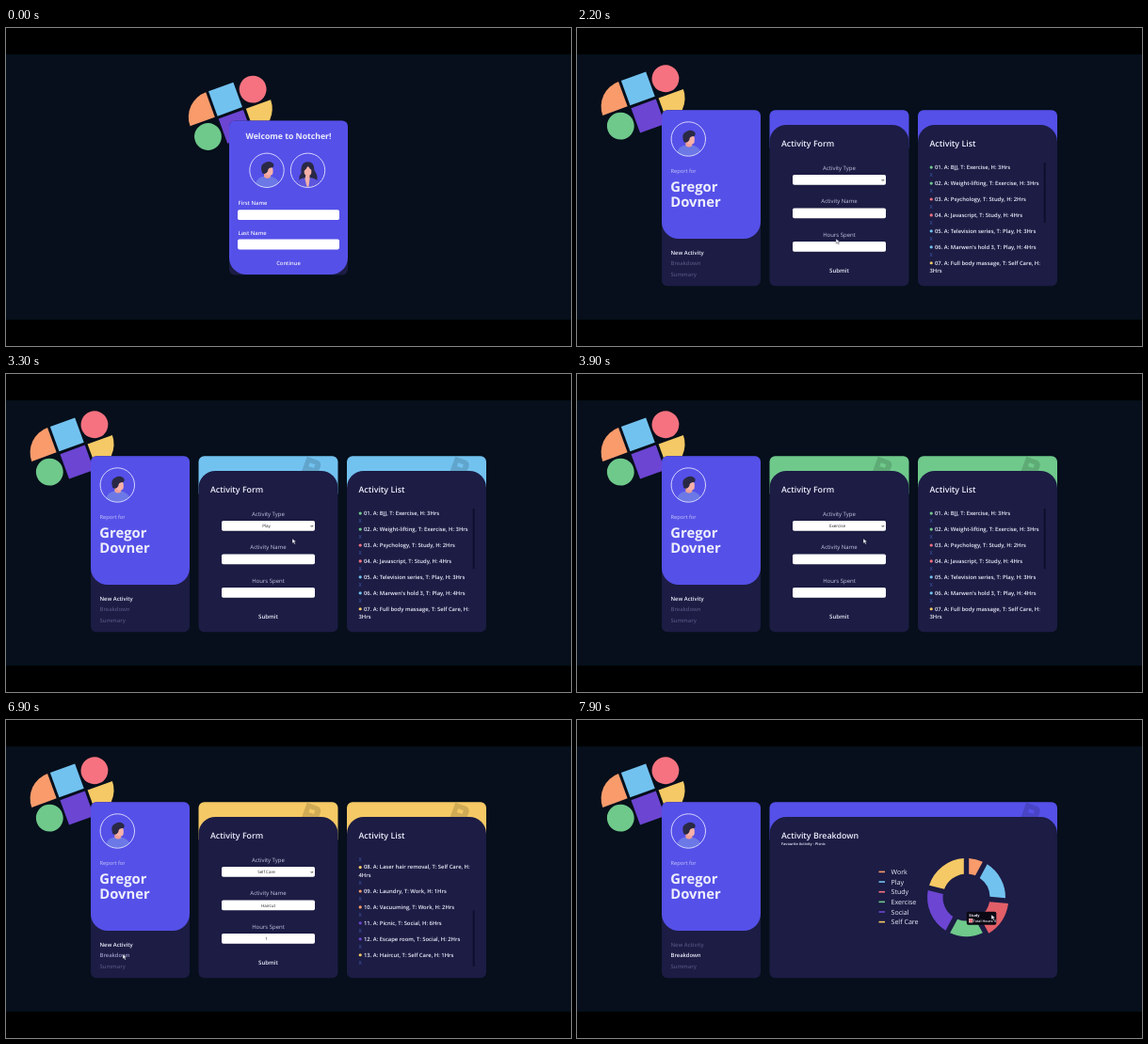
An HTML page for the animation above (8000 ms loop, 600 by 338 pixels).

```html
<!DOCTYPE html>
<html lang="en">
<head>
<meta charset="utf-8">
<title>Activity report demo</title>
<style>
html, body { margin: 0; width: 100%; height: 100%; overflow: hidden; background: #000; }
svg { display: block; width: 100vw; height: 100vh; }
text { font-family: "Open Sans", "Noto Sans", sans-serif; font-weight: 600; fill: #eeeefc; text-rendering: geometricPrecision; white-space: pre; }
.b { font-weight: 700; }
.r { font-weight: 400; }
.m { text-anchor: middle; }
.soft { fill: #c6c6e4; }
.field { fill: #222; font-weight: 400; }
</style>
</head>
<body>
<svg id="stage" viewBox="0 0 600 338"></svg>
<script>
const INDIGO = '#5550e8', NAVY = '#1c1c44', LOOP = 8000, LINE = 8.47;
const COLOR = {
  Work: '#f99b6b', Play: '#72c2f0', Study: '#f67280',
  Exercise: '#6fc98b', Social: '#6c45d2', 'Self Care': '#f5c965'
};
const FIRST = 'Gregor', LAST = 'Dovner';
const ACTIVITIES = [
  ['BJJ', 'Exercise', 3], ['Weight-lifting', 'Exercise', 3], ['Psychology', 'Study', 2],
  ['Javascript', 'Study', 4], ['Television series', 'Play', 3], ["Marwen's hold 3", 'Play', 4],
  ['Full body massage', 'Self Care', 3], ['Laser hair removal', 'Self Care', 4],
  ['Laundry', 'Work', 1], ['Vacuuming', 'Work', 2], ['Picnic', 'Social', 6],
  ['Escape room', 'Social', 2], ['Haircut', 'Self Care', 1]
];

// --- markup helpers ---
const text = (x, y, size, str, cls = '', more = '') =>
  `<text x="${x}" y="${y}" font-size="${size}" class="${cls}" ${more}>${str}</text>`;
const rect = (x, y, w, h, fill, r = 0, more = '') =>
  `<rect x="${x}" y="${y}" width="${w}" height="${h}" rx="${r}" fill="${fill}" ${more}/>`;
const disc = (x, y, r, fill, more = '') => `<circle cx="${x}" cy="${y}" r="${r}" fill="${fill}" ${more}/>`;
const path = (d, fill, more = '') => `<path d="${d}" fill="${fill}" ${more}/>`;
const input = (x, y, w) => rect(x, y, w, 10.8, '#fff', 1.8);

// Box with separate top and bottom corner radii
function panel(x, y, w, h, top, bottom, fill, more) {
  return path(`M${x} ${y + top}a${top} ${top} 0 0 1 ${top} ${-top}h${w - 2 * top}a${top} ${top} 0 0 1 ${top} ${top}` +
    `v${h - top - bottom}a${bottom} ${bottom} 0 0 1 ${-bottom} ${bottom}h${2 * bottom - w}a${bottom} ${bottom} 0 0 1 ${-bottom} ${-bottom}z`, fill, more);
}

function shapes(x, y) {
  return `<g transform="translate(${x} ${y}) rotate(-20)">` +
    path('M-17 14h-28a28 28 0 0 1 28-28z', COLOR.Work) + rect(-14, -14, 28, 28, COLOR.Play) +
    disc(31, 0, 14.4, COLOR.Study) + disc(-31, 31, 14.4, COLOR.Exercise) +
    rect(-14, 17, 28, 28, COLOR.Social) + path('M17 17h28a28 28 0 0 1-28 28z', COLOR['Self Care']) + '</g>';
}

const ring = disc(0, 0, 18.2, 'none', 'stroke="#e4e4ff" stroke-width=".9"');
const man = path('M-12 14Q-10 7-3 6.5L4 6.5Q11 8 13 13Q8 18 0 18Q-8 18-12 14z', '#6b78e6') +
  path('M-3 2h7v5q-3 3-7 0z', '#ee9f98') + rect(-1.5, -4, 8, 9.5, '#f6b1a8', 3.5) +
  path('M-5 3Q-8-6-2-8Q3-11 7-7Q8-4 6-3Q1-3 1 1Q-1 5-5 3z', '#2a2945') + ring;
const woman = path('M-8 13Q-11 8-7 3Q-8-9 0-9Q7-9 7 0Q12 7 9 13Q0 17-8 13z', '#2a2945') +
  path('M-12 14Q-9 8-3 8L4 8Q10 9 12 14Q6 18 0 18Q-7 18-12 14z', '#5d55dc') +
  path('M-2 3h4v6l-1 8.5h-2l-2-8z', '#f2b0aa') + rect(-3.8, -4, 7.6, 9.5, '#f6b1a8', 3.6) +
  path('M-5 1Q-5-7 1-7Q5-6 5 0Q2-1 0-5Q-2 0-5 1z', '#2a2945') + ring;
const avatar = (x, y, who, id = '') => `<g id="${id}" transform="translate(${x} ${y})">${who}</g>`;

function card(x, w, title) {
  const icon = x + w - 28;
  return panel(x, 87.3, w, 40, 6, 0, INDIGO, 'class="banner"') +
    `<g class="icon" opacity=".15" transform="translate(${icon} 98) rotate(20)">` +
    path('M-8-8h12a5 5 0 0 1 5 5v5a5 5 0 0 1-5 5h-4v9h-8zM-3-3v4h6v-4z', '#000', 'fill-rule="evenodd"') + '</g>' +
    panel(x, 103, w, 171.3, 18, 6, NAVY) + text(x + 12.5, 125.5, 8.85, title);
}

// --- scenes ---
const login = shapes(233, 75.7) +
  panel(237, 98.5, 126, 164, 6, 6, NAVY) + panel(237, 98.5, 126, 163.5, 6, 18, INDIGO) +
  text(300, 118, 8.7, 'Welcome to Notcher!', 'b m') +
  avatar(277, 151.3, man, 'picked') + avatar(320.5, 151.3, woman) +
  text(246.5, 188.3, 5.85, 'First Name') + input(246, 193.2, 108) + text(300, 200.3, 4.5, '', 'field m', 'id="first"') +
  text(246.5, 220, 5.85, 'Last Name') + input(246, 224.6, 108) + text(300, 231.8, 4.5, '', 'field m', 'id="last"') +
  text(300, 251.6, 5.85, 'Continue', 'm');

const side = shapes(64.8, 64.4) +
  panel(90, 87.3, 105, 187, 6, 6, NAVY) + panel(90, 87.3, 105, 136.7, 6, 18, INDIGO) +
  avatar(118.3, 118, man) + text(99.5, 153.6, 5.7, 'Report for', 'r', 'style="fill:#c9c8fa"') +
  text(99.3, 174, 14.8, FIRST, 'b') + text(99.3, 189.5, 14.8, LAST, 'b') +
  ['New Activity', 'Breakdown', 'Summary'].map((s, i) =>
    text(99.5, 240.5 + 11.5 * i, 5.9, s, 'menu')).join('');

const form = card(204.5, 148, 'Activity Form') +
  ['Activity Type', 'Activity Name', 'Hours Spent'].map((s, i) =>
    text(278.5, 150.5 + 35.5 * i, 6, s, 'r m soft') + input(229, 156 + 35.5 * i, 99)).join('') +
  path('M323.6 161l1.3 1.4 1.3-1.4', 'none', 'stroke="#222" stroke-width=".8"') +
  text(276.5, 163.2, 4.5, '', 'field m', 'id="type"') +
  text(278.5, 198.7, 4.5, '', 'field m', 'id="name"') +
  text(276.5, 234.2, 4.5, '', 'field m', 'id="hours"') +
  path('M321.8 232l1.3-1.6 1.3 1.6zM321.8 233.2l1.3 1.6 1.3-1.6z', '#555', 'id="spin"') +
  text(278.5, 260.2, 6.05, 'Submit', 'm');

let line = 0;
const rows = ACTIVITIES.map(([name, type, hours], i) => {
  const y = 150 + line * LINE, wraps = i === 6 || i === 7;
  const head = `${String(i + 1).padStart(2, '0')}. A: ${name}, T: ${type}, H:`;
  line += wraps ? 3 : 2;
  return `<g class="row">` + disc(376.2, y - 1.9, 1.6, COLOR[type]) +
    text(380, y, 5.85, wraps ? head : `${head} ${hours}Hrs`) +
    (wraps ? text(374.5, y + LINE, 5.85, hours + 'Hrs') : '') +
    text(374.5, 150 + (line - 1) * LINE, 5.6, 'X', 'r', 'style="fill:#4560b8"') + '</g>';
}).join('');
const list = card(362, 148, 'Activity List') +
  `<clipPath id="view"><rect x="370" y="143" width="130" height="119"/></clipPath>` +
  `<g clip-path="url(#view)"><g id="rows">${rows}</g></g>` + rect(495.8, 143, 1.8, 60, '#0e0e2b', 0, 'id="thumb"');

const types = Object.keys(COLOR);
const breakdown = card(204.5, 305.5, 'Activity Breakdown') +
  text(217, 133, 3.9, 'Favourite Activity - Picnic') +
  types.map((type, i) => rect(320.5, 160.6 + 10.65 * i, 6.5, 1.6, COLOR[type]) +
    text(333.5, 164 + 10.65 * i, 7.1, type, 'r') + path('', COLOR[type], 'class="slice"')).join('') +
  `<g id="tip">` + rect(413.8, 203.8, 31.5, 14, '#0a0812', 1.8) + text(416.3, 209, 3.9, 'Study', 'b') +
  rect(416.3, 211.3, 3.8, 3.8, COLOR.Study, 0, 'stroke="#fff" stroke-width=".4"') +
  text(420.8, 214.7, 3.7, 'Total Hours: 6') + '</g>';

const stage = document.getElementById('stage');
stage.innerHTML = rect(0, 0, 600, 338, '#000') + rect(0, 28, 600, 282, '#060f1b') +
  `<g id="login">${login}</g><g id="side">${side}</g><g id="entry">${form}${list}</g><g id="stats">${breakdown}</g>` +
  `<g id="cursor">` + path('M0 0v5l1.3-1.1 1 2 1-.5-1-1.9 1.7-.2z', '#f4f4ff', 'id="arrow" stroke="#223" stroke-width=".4"') +
  path('M-.8-4h1.6M0-4v8M-.8 4h1.6', 'none', 'id="beam" stroke="#333" stroke-width=".6"') + '</g>';

// --- motion ---
const $ = id => document.getElementById(id);
const all = sel => [...stage.querySelectorAll(sel)];
const banners = all('.banner'), icons = all('.icon'), menu = all('.menu'), lines = all('.row'), slices = all('.slice');
const show = (el, on) => el.style.display = on ? '' : 'none';
const clamp = (t, a, b) => Math.min(1, Math.max(0, (t - a) / (b - a)));
const ease = p => p * p * (3 - 2 * p);
const typed = (str, t, a, b) => str.slice(0, Math.round(str.length * clamp(t, a, b)));

const PICKS = [[2800, 'Work'], [3150, 'Play'], [3600, 'Study'], [3850, 'Exercise'], [4100, 'Social'], [4350, 'Self Care']];
const MOVES = [
  [100, 300, 175], [300, 277, 152], [600, 277, 199], [1800, 277, 199], [2200, 275, 224],
  [2700, 305, 162], [3250, 304, 175], [4450, 304, 175], [4650, 278, 197], [5050, 278, 197],
  [5200, 278, 232], [5400, 282, 257], [5600, 282, 257], [5900, 440, 200], [6400, 440, 200],
  [6900, 124, 249], [7350, 124, 249], [7750, 440, 207]
];

function pointer(t) {
  let i = MOVES.findIndex(k => k[0] > t);
  if (i < 0) return MOVES[MOVES.length - 1].slice(1);
  if (!i) i = 1;
  const [a, x, y] = MOVES[i - 1], [b, u, v] = MOVES[i], p = ease(clamp(t, a, b));
  return [x + (u - x) * p, y + (v - y) * p];
}

function slice(from, to, outer) {
  const at = (r, a) => `${413.5 + r * Math.sin(a)} ${188.5 - r * Math.cos(a)}`;
  const inner = 25, g = 2.7 / outer, h = 2.7 / inner;
  if (to - from < 2 * h) return '';
  return `M${at(outer, from + g)}A${outer} ${outer} 0 0 1 ${at(outer, to - g)}` +
    `L${at(inner, to - h)}A${inner} ${inner} 0 0 0 ${at(inner, from + h)}z`;
}

function drawChart(t) {
  const grow = 1 - (1 - clamp(t, 7150, 7900)) ** 4, hover = t >= 7700;
  const sum = type => ACTIVITIES.reduce((n, a) => n + (a[1] === type ? a[2] : 0), 0);
  const total = ACTIVITIES.reduce((n, a) => n + a[2], 0);
  let angle = 0;
  types.forEach((type, i) => {
    const end = angle + sum(type) / total * 2 * Math.PI * grow, lit = hover && type === 'Study';
    slices[i].setAttribute('d', slice(angle, end, lit ? 45 : 41.5));
    slices[i].setAttribute('fill', lit ? '#e25f68' : COLOR[type]);
    angle = end;
  });
  show($('tip'), hover);
}

function render(t) {
  const home = t < 1800, stats = t >= 7150;
  show($('login'), home);
  show($('side'), !home);
  show($('entry'), !home && !stats);
  show($('stats'), stats);

  $('picked').setAttribute('transform', `translate(277 ${151.3 - 3 * ease(clamp(t, 250, 450))})`);
  $('first').textContent = typed(FIRST, t, 650, 1050);
  $('last').textContent = typed(LAST, t, 1150, 1580) + (t > 1150 ? '|' : '');

  const pick = PICKS.filter(p => p[0] <= t).pop(), type = pick ? pick[1] : '';
  $('type').textContent = type;
  $('name').textContent = typed('Haircut', t, 4700, 5050);
  $('hours').textContent = t >= 5200 ? '1' : '';
  show($('spin'), t >= 5100 && t < 5600);
  banners.forEach(b => b.setAttribute('fill', stats || !type ? INDIGO : COLOR[type]));
  icons.forEach(i => show(i, stats || type));

  const count = t >= 5600 ? 28 : 26, scroll = 14 * ease(clamp(t, 5950, 6350));
  show(lines[12], count === 28);
  $('rows').setAttribute('transform', `translate(0 ${-scroll * LINE})`);
  $('thumb').setAttribute('y', 143 + 119 * scroll / count);
  $('thumb').setAttribute('height', 119 * 14 / count);

  const hot = t >= 6820 && !stats;
  menu.forEach((el, i) => el.style.fill = i === +stats ? '#eeeefc' : i === 1 && hot ? '#9a9ac8' : '#50507e');
  if (stats) drawChart(t);

  const [x, y] = pointer(t), beam = home && y > 193 || t > 4600 && t < 5230;
  show($('cursor'), t >= 100);
  $('cursor').setAttribute('transform', `translate(${x} ${y})`);
  show($('arrow'), !beam);
  show($('beam'), beam);
}

const start = performance.now();
function tick() {
  render((performance.now() - start) % LOOP);
  requestAnimationFrame(tick);
}
tick();
</script>
</body>
</html>
```
